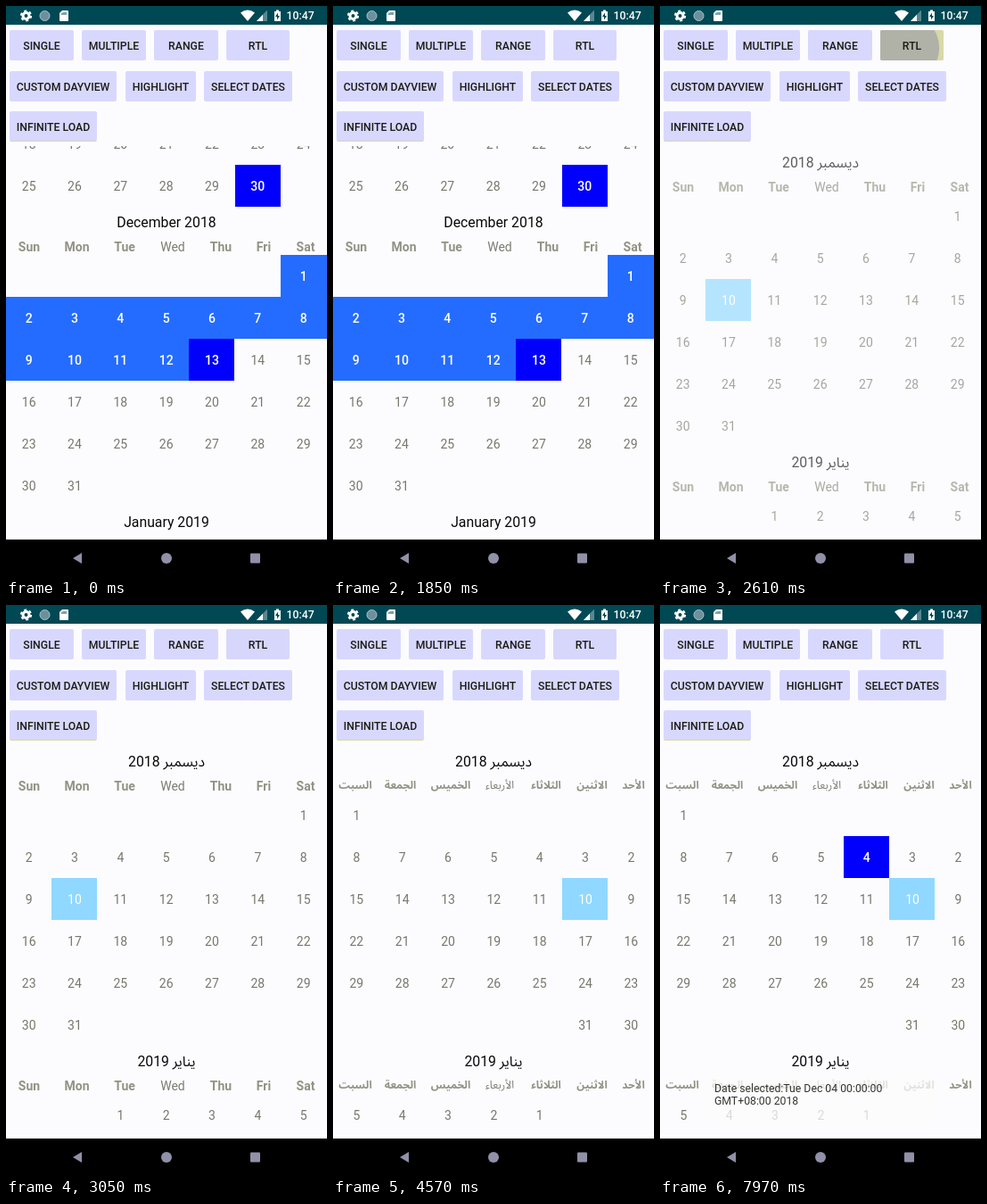
These frames come from a looping animation (360x640 px, 8000 ms). An HTML page:

```html
<!DOCTYPE html>
<html lang="en">
<head>
<meta charset="utf-8">
<style>
html, body { margin: 0; width: 100%; height: 100%; overflow: hidden; background: #fcfcfe; }
svg { display: block; width: 360px; height: 640px; }
text { font: 14px Roboto, "Noto Sans Arabic", "DejaVu Sans", sans-serif; text-anchor: middle; fill: #77776d; }
.title { font-size: 15.8px; fill: #080808; }
.head { font-weight: 700; fill: #929284; }
.wed { font-weight: 400; fill: #7c7c72; }
.ar { font-size: 12px; }
.sel { font-weight: 500; fill: #fff; }
.today { fill: #fff; }
.btn { font-size: 12.26px; font-weight: 500; fill: #1c1c16; }
.clock { font-size: 12.26px; font-weight: 500; fill: #fff; text-anchor: start; }
.toast { font-size: 12.26px; fill: #34342e; text-anchor: start; }
</style>
</head>
<body>
<svg viewBox="0 0 360 640">
  <defs>
    <clipPath id="list"><rect y="157" width="360" height="437"/></clipPath>
    <clipPath id="key"><rect x="247" y="27" width="71" height="34" rx="2"/></clipPath>
  </defs>
  <rect width="360" height="640" fill="#fcfcfe"/>
  <rect y="594" width="360" height="4" fill="#fff"/>
  <g clip-path="url(#list)">
    <g id="range"></g><g id="ltr"></g><g id="rtl"></g>
  </g>
  <g id="toast">
    <rect x="45" y="525" width="269" height="56" rx="20" fill="#fcfcfe" opacity=".74"/>
    <text class="toast" x="61" y="546">Date selected:Tue Dec 04 00:00:00</text>
    <text class="toast" x="61" y="560">GMT+08:00 2018</text>
  </g>
  <g id="buttons"></g>
  <g id="press" clip-path="url(#key)">
    <rect x="247" y="27" width="71" height="34" fill="#d8d8a8"/>
    <circle id="ripple" cx="275" cy="47"/>
    <text class="btn" x="282.5" y="48.5">RTL</text>
  </g>

  <rect width="360" height="21" fill="#004854"/>
  <g fill="#fff">
    <circle cx="22.5" cy="11" r="3.5" fill="none" stroke="#fff" stroke-width="3"/>
    <circle cx="22.5" cy="11" r="5.6" fill="none" stroke="#fff" stroke-width="2" stroke-dasharray="2.93"/>
    <circle cx="43.5" cy="11" r="5.5" fill="#6c909c" stroke="#a8c0c8"/>
    <path d="M63 5h6q1 0 1 1v10q0 1-1 1h-8q-1 0-1-1V8z"/>
    <path d="M63 7.5v2.5M65 7v3M67 7v3" stroke="#004854"/>
    <path d="M263 7.5Q271 1.5 279 7.5L271 17z"/>
    <path d="M293 4.5V17H281z" opacity=".35"/>
    <path d="M288 9.7V17h-7z"/>
    <path d="M301 6h2V4.500h3V6h2v11h-7z"/>
    <path d="M305 7.500l-3 4.500h2v3.500l3-4.500h-2z" fill="#004854"/>
    <text class="clock" x="314.500" y="15.300">10:47</text>
  </g>
  <rect y="598" width="360" height="42"/>
  <g fill="#9090a8">
    <path d="M75 619l10-6v12z"/>
    <circle cx="180" cy="619" r="6"/>
    <rect x="274" y="613.500" width="11" height="11" rx="1"/>
  </g>
</svg>
<script>
const $ = id => document.getElementById(id);
const clamp = v => Math.max(0, Math.min(1, v));
const CELL = 51.33, ROW = 47;
const BLUE = '#0000fc', MID = '#246cff', TODAY = '#90d8ff';
const DAYS = {
  names: 'Sun Mon Tue Wed Thu Fri Sat'.split(' '),
  at: [26, 79.5, 133, 187, 241, 289, 336]
};
const ARABIC = {
  names: ['الأحد', 'الاثنين', 'الثلاثاء', 'الأربعاء', 'الخميس', 'الجمعة', 'السبت'],
  at: [337, 290.5, 239, 187, 132, 75.5, 25], rtl: true
};

const text = (x, y, s, cls = '', extra = '') =>
  `<text x="${x}" y="${y}" class="${cls}" ${extra}>${s}</text>`;
const rect = (x, y, w, h, fill, extra = '') =>
  `<rect x="${x}" y="${y}" width="${w}" height="${h}" fill="${fill}" ${extra}/>`;

// One month whose title baseline is at y; fills maps a day to its cell colour.
function month(y, title, first, count, week, fills = {}) {
  const arabic = /[^ -~]/.test(title);
  let out = text(180, y, title, 'title', arabic ? 'direction="rtl"' : '');
  week.names.forEach((name, i) => {
    const cls = 'head' + (i == 3 ? ' wed' : '') + (week.rtl ? ' ar' : '');
    out += text(week.at[i], y + (week.rtl ? 25 : 26.5), name, cls, week.rtl ? 'direction="rtl"' : '');
  });
  for (let day = 1; day <= count; day++) {
    const slot = first + day - 1, col = slot % 7, row = Math.floor(slot / 7);
    const x = week.rtl ? 360 - CELL * (col + 1) : CELL * col;
    const top = y + 31 + ROW * row, fill = fills[day];
    if (fill) out += rect(Math.round(x), top, fill == MID ? 52 : 51, ROW, fill);
    out += text(x + CELL / 2, top + 28.5, day, fill == TODAY ? 'today' : fill ? 'sel' : '');
  }
  return out;
}

const span = { 13: BLUE };
for (let d = 1; d < 13; d++) span[d] = MID;
$('range').innerHTML = month(-41, 'November 2018', 4, 30, DAYS, { 30: BLUE }) +
  month(248, 'December 2018', 6, 31, DAYS, span) +
  month(584, 'January 2019', 2, 31, DAYS);

const pair = week => month(181, 'ديسمبر 2018', 6, 31, week, { 10: TODAY }) +
  month(517, 'يناير 2019', 2, 31, week);
$('ltr').innerHTML = pair(DAYS);
$('rtl').innerHTML = pair(ARABIC) +
  '<g id="pick">' + rect(206, 259, 51, ROW, BLUE, 'id="cell"') + text(231.7, 287.5, 4, '', 'id="four"') + '</g>';

$('buttons').innerHTML = [
  ['SINGLE', 4, 27, 72], ['MULTIPLE', 85, 27, 72], ['RANGE', 166, 27, 72], ['RTL', 247, 27, 71],
  ['CUSTOM DAYVIEW', 4, 73, 120], ['HIGHLIGHT', 134, 73, 79], ['SELECT DATES', 222, 73, 99],
  ['INFINITE LOAD', 4, 118, 98]
].map(([s, x, y, w]) => rect(x, y, w, 34, '#d8d8ff', 'rx="2"') + text(x + w / 2, y + 21.5, s, 'btn')).join('') +
  rect(5, 151, 96, 1, '#d8d8a8');

const TAP1 = 2520, TAP2 = 4040, PICK = 7660;
const show = (id, alpha) => $(id).setAttribute('opacity', alpha);

function draw() {
  const t = performance.now() % 8000;
  const appear = start => clamp((t - start - 20) / 110);
  show('range', t < TAP1 ? 1 : 0);
  show('ltr', t < TAP2 ? appear(TAP1) : 0);
  show('rtl', appear(TAP2));

  const age = t - (t < TAP2 ? TAP1 : TAP2);
  show('press', age < 0 ? 0 : clamp((540 - age) / 280));
  $('ripple').setAttribute('r', 18 + clamp(age / 180) * 40);
  $('ripple').setAttribute('fill', `rgb(176,${216 - 38 * clamp(age / 90)},168)`);

  const done = t >= PICK + 50;
  show('pick', t < PICK ? 0 : 1);
  $('cell').setAttribute('fill', done ? BLUE : '#d8d8ff');
  $('four').setAttribute('class', done ? 'sel' : '');
  show('toast', t < PICK ? 0 : clamp(.3 + (t - PICK) / 300));
  requestAnimationFrame(draw);
}
draw();
</script>
</body>
</html>
```
